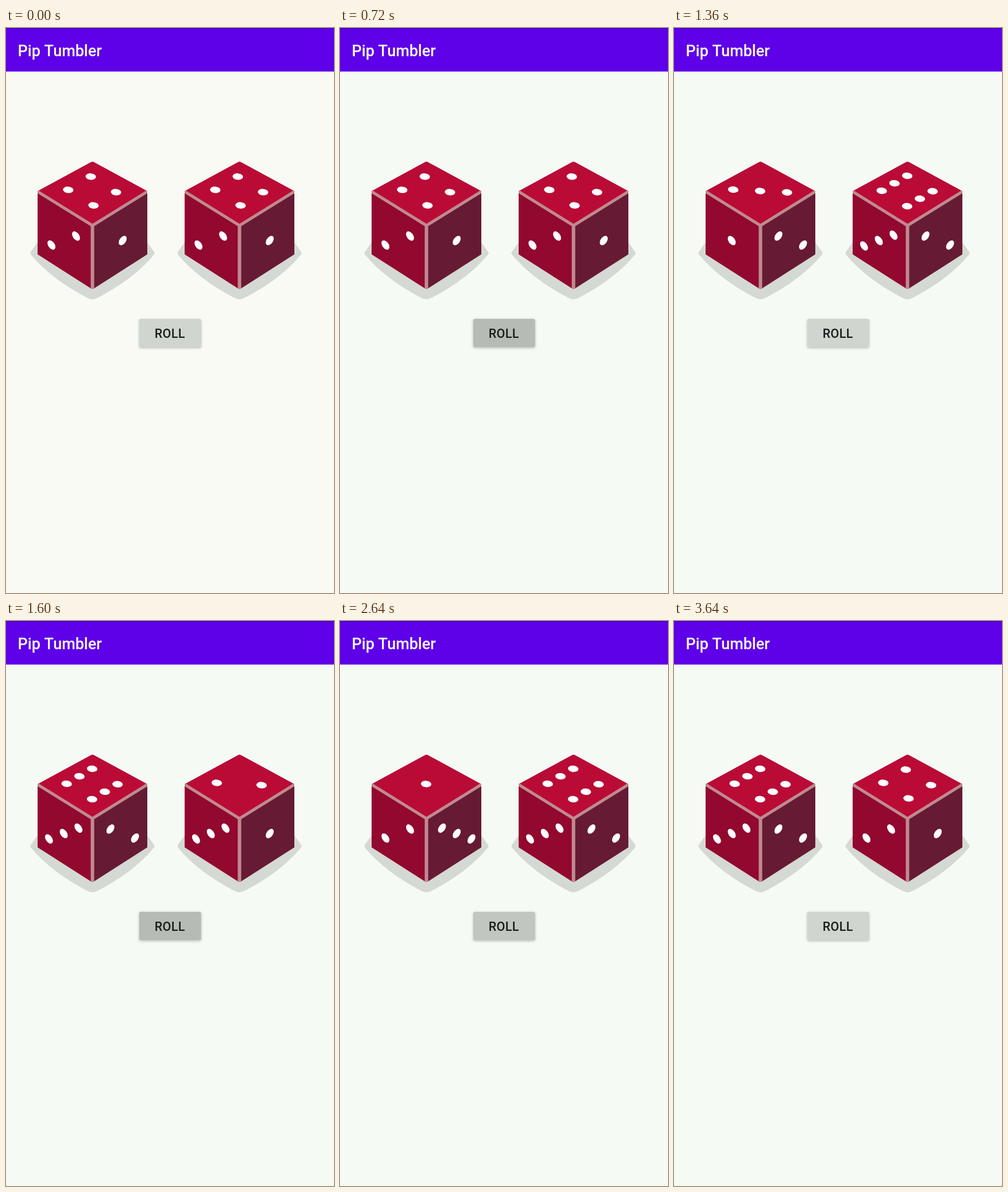
These frames come from a looping animation (571x981 px, 3680 ms). An HTML page with a canvas:

```html
<!DOCTYPE html>
<html lang="en">
<head>
<meta charset="utf-8">
<title>Pip Tumbler</title>
<style>
  html, body { margin: 0; width: 100%; height: 100%; overflow: hidden; background: #f5faf5; }
  canvas { display: block; width: 571px; height: 981px; }
</style>
</head>
<body>
<canvas id="stage" width="571" height="981"></canvas>
<script>
const ctx = document.getElementById('stage').getContext('2d');
const LOOP = 3680;

// Each roll happens as the button is let go.
const START = [4, 4];
const ROLLS = [
  { at: 760, faces: [3, 6] },
  { at: 1560, faces: [6, 2] },
  { at: 2520, faces: [1, 6] },
  { at: 3420, faces: [6, 4] }
];

// Die geometry, measured from its vertical axis.
const HALF = 95.5, PEAK = 232, SHOULDER = 283, FRONT = 343, FOOT = 393, BASE = 454;

const clamp = x => Math.max(0, Math.min(1, x));
const mix = (a, b, p) => `rgb(${a.map((v, i) => Math.round(v + (b[i] - v) * p)).join()})`;

function path(...points) {
  ctx.beginPath();
  points.forEach(([x, y]) => ctx.lineTo(x, y));
}

function fillPath(color, ...points) {
  path(...points);
  ctx.fillStyle = color;
  ctx.fill();
}

// Evenly spaced pips on a diagonal; odd counts reach further out.
function diagonal(count, dx, dy) {
  const reach = count % 2 ? 1.2 : 1;
  return Array.from({ length: count }, (_, i) => {
    const k = count > 1 ? reach * (2 * i / (count - 1) - 1) : 0;
    return [k * dx, k * dy];
  });
}

function topPips(value) {
  if (value < 4) return diagonal(value, 39, 2);
  if (value === 4) return [...diagonal(2, 41.6, 2), ...diagonal(2, 2.4, 25)];
  return [-1, 1].flatMap(row => [-1, 0, 1].map(col =>
    [22.1 * row - 22.2 * col, 13.4 * row + 13 * col]));
}

// Low faces cycle around a corner; high faces mirror the face opposite.
function sideValues(value) {
  const low = Math.min(value, 7 - value);
  const sides = [low % 3 + 1, (low + 1) % 3 + 1];
  return value > 3 ? sides.reverse() : sides;
}

function drawPips(points, cx, cy, degrees) {
  ctx.fillStyle = '#fff';
  for (const [x, y] of points) {
    ctx.beginPath();
    ctx.ellipse(cx + x, cy + y, 9.1, 5.6, degrees * Math.PI / 180, 0, Math.PI * 2);
    ctx.fill();
  }
}

function drawShadowHalf(side) {
  ctx.save();
  ctx.scale(side, 1);
  ctx.fillStyle = '#d5d9d3';
  path([-1, 370], [94, 370], [107.5, 389]);
  ctx.quadraticCurveTo(109, 391, 107.5, 393);
  ctx.quadraticCurveTo(72, 436, 8, 469);
  ctx.quadraticCurveTo(4, 471, -1, 471);
  ctx.fill();
  ctx.restore();
}

function drawBody() {
  const left = [-HALF, SHOULDER], right = [HALF, SHOULDER], front = [0, FRONT];
  ctx.save();
  path([-3, PEAK + 1], [0, PEAK], [3, PEAK + 1], right, [HALF, FOOT],
    [3, BASE - 2], [0, BASE - 1], [-3, BASE - 2], [-HALF, FOOT], left);
  ctx.clip();
  fillPath('#b90b36', left, [0, PEAK - 1], right, front);
  fillPath('#92082f', left, front, [0, BASE], [-HALF, BASE]);
  fillPath('#661a33', right, front, [0, BASE], [HALF, BASE]);
  ctx.strokeStyle = '#c08a8f';
  ctx.lineWidth = 5;
  path([-HALF - 4, SHOULDER - 1.5], front, [HALF + 4, SHOULDER - 1.5]);
  ctx.stroke();
  ctx.lineWidth = 6;
  path(front, [0, BASE]);
  ctx.stroke();
  ctx.restore();
}

function drawDie(axis, value) {
  const [left, right] = sideValues(value);
  ctx.save();
  ctx.translate(axis, 0);
  [-1, 1].forEach(drawShadowHalf);
  drawBody();
  drawPips(topPips(value), -0.6, 283, 5);
  drawPips(diagonal(left, 21.4, -7.8), -50, 369, 55);
  drawPips(diagonal(right, 21.4, 7.8), 52.7, 369, -55);
  ctx.restore();
}

function pressAmount(t) {
  return Math.max(...ROLLS.map(({ at }) =>
    t < at ? clamp((t - at + 160) / 100) : 1 - clamp((t - at - 60) / 150)));
}

function drawLabel(text, x, y, size, color) {
  ctx.font = `500 ${size}px Roboto, sans-serif`;
  ctx.fillStyle = color;
  ctx.fillText(text, x, y);
}

function drawButton(press) {
  ctx.save();
  ctx.shadowColor = 'rgba(0,0,0,0.26)';
  ctx.shadowBlur = 4 + press;
  ctx.shadowOffsetY = 1.5;
  ctx.fillStyle = mix([208, 213, 207], [182, 188, 181], press);
  ctx.beginPath();
  ctx.roundRect(232, 505, 107.5, 49, 2.5);
  ctx.fill();
  ctx.restore();
  ctx.letterSpacing = '0.4px';
  drawLabel('ROLL', 258.7, 538, 21.5, '#171c19');
  ctx.letterSpacing = '0px';
}

function drawBar() {
  ctx.fillStyle = '#5e00e8';
  ctx.fillRect(0, 0, 571, 75.6);
  ctx.fillStyle = '#4a00bd';
  ctx.fillRect(0, 0, 571, 1.5);
  drawLabel('Pip Tumbler', 20.5, 49, 27, '#fff');
}

function draw(t) {
  ctx.fillStyle = mix([248, 250, 243], [245, 250, 245], clamp(t / 600));
  ctx.fillRect(0, 0, 571, 981);
  drawBar();
  const faces = ROLLS.reduce((shown, roll) => t >= roll.at ? roll.faces : shown, START);
  faces.forEach((value, i) => drawDie(150.5 + i * 256, value));
  drawButton(pressAmount(t));
}

const begin = performance.now();
function tick() {
  draw((performance.now() - begin) % LOOP);
  requestAnimationFrame(tick);
}
tick();
</script>
</body>
</html>
```
